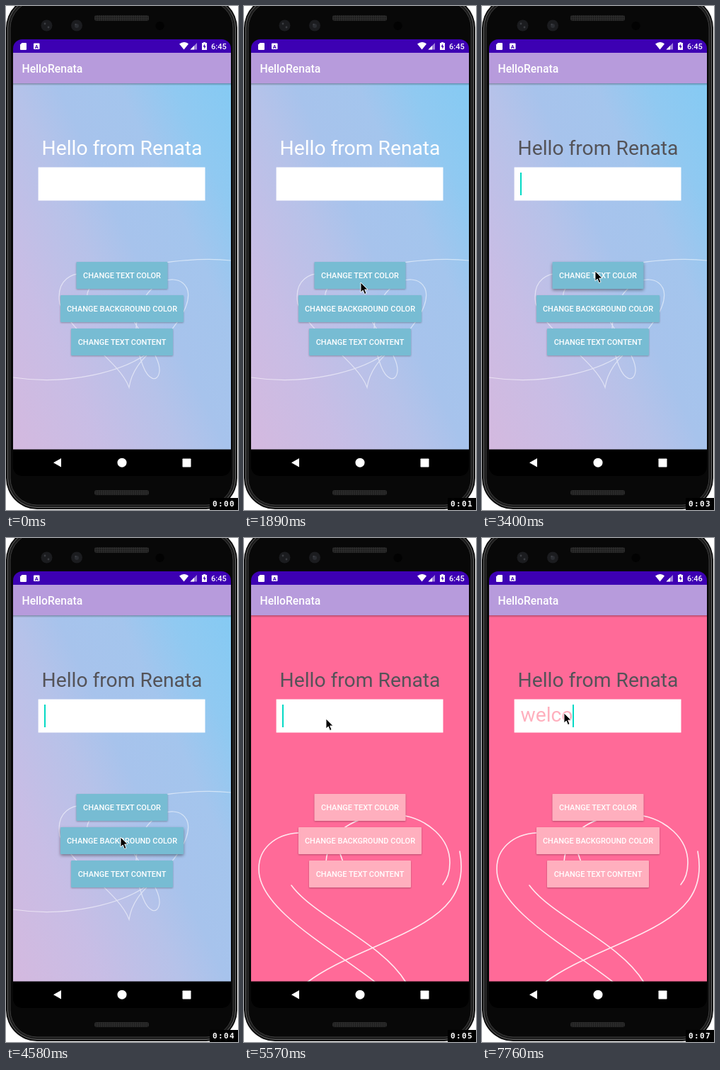
An HTML page that plays this animation: 328x711 px, repeating every 8000 ms.

```html
<!DOCTYPE html>
<html lang="en">
<head>
<meta charset="utf-8">
<title>HelloRenata</title>
<style>
html, body { margin: 0; width: 100%; height: 100%; overflow: hidden; background: #fff; }
svg { display: block; width: 328px; height: 711px; font-family: Roboto, sans-serif; }
.mid { text-anchor: middle; }
.medium { font-weight: 500; fill: #fff; }
.big { font-size: 28.25px; }
.lines { fill: none; stroke: #fff; stroke-linecap: round; }
.clock { font: bold 11px "DejaVu Sans Mono", monospace; letter-spacing: 1.38px; fill: #fff; }
</style>
</head>
<body>
<svg viewBox="0 0 328 711">
  <defs>
    <linearGradient id="sky" gradientUnits="userSpaceOnUse" x1="10" y1="626" x2="454" y2="419">
      <stop offset="0" stop-color="#d4b9df"/>
      <stop offset=".235" stop-color="#c8bde5"/>
      <stop offset=".44" stop-color="#b6c2e9"/>
      <stop offset=".56" stop-color="#a7c3ec"/>
      <stop offset=".72" stop-color="#a4c5ed"/>
      <stop offset=".86" stop-color="#90c9f1"/>
      <stop offset="1" stop-color="#86caf3"/>
    </linearGradient>
    <linearGradient id="barShade" x2="0" y2="1">
      <stop offset="0" stop-color="#000" stop-opacity=".28"/>
      <stop offset="1" stop-color="#000" stop-opacity="0"/>
    </linearGradient>
    <pattern id="mesh" width="3" height="3" patternUnits="userSpaceOnUse">
      <rect width="3" height="3" fill="#2c2c2c"/>
      <circle cx="1.5" cy="1.5" r=".9" fill="#151515"/>
    </pattern>
    <clipPath id="screen"><rect x="10" y="47" width="308" height="616" rx="13"/></clipPath>
  </defs>

  <!-- phone body -->
  <rect y="-13" width="327" height="723" rx="44" fill="#0c0c0c"/>
  <rect x="2.500" y="-10.500" width="322" height="718" rx="41.500" fill="#1c1c1c" stroke="#666"/>
  <rect x="6" y="-7" width="315" height="711" rx="38" fill="#080808" stroke="#3c3c3c"/>
  <rect x="125" y="13" width="77" height="8" rx="3" fill="url(#mesh)"/>
  <rect x="125" y="683" width="77" height="7" rx="3" fill="url(#mesh)"/>
  <g fill="#1b1c1f">
    <circle cx="57.500" cy="27.500" r="8"/><circle cx="100" cy="27.500" r="8"/>
    <circle cx="217.500" cy="28" r="6" fill="#020202"/>
  </g>
  <g fill="#3b3d42">
    <circle cx="55" cy="25" r="1.400"/><circle cx="60" cy="30" r="1.400"/>
    <circle cx="100" cy="28" r="3" fill="#2b2d32"/><circle cx="98.500" cy="26" r="1.200"/>
  </g>

  <g clip-path="url(#screen)">
    <g id="blueWall">
      <rect x="10" y="109" width="308" height="518" fill="url(#sky)"/>
      <g class="lines" stroke-width="1.200" opacity=".55">
        <path d="M10 524C90 536 165 515 200 490C235 462 262 425 257 402C252 382 225 380 205 400C180 425 180 470 191 500C200 530 215 532 217 515C218 495 195 470 178 440"/>
        <path d="M318 359C270 354 200 362 150 378C115 390 105 410 125 425"/>
        <path d="M115 378C95 375 70 385 76 420C90 460 160 500 174 538C178 512 195 495 215 478"/>
      </g>
    </g>
    <g id="pinkWall">
      <rect x="10" y="109" width="308" height="518" fill="#ff6a98"/>
      <g class="lines" stroke-width="1.600" opacity=".85">
        <path d="M77 416C42 418 20 440 21 468C21 525 130 582 186 627"/>
        <path d="M67 490C100 535 195 570 229 627"/>
        <path d="M305 442C316 500 285 530 226 558C165 587 125 600 89 627"/>
        <path d="M116 457C117 440 125 420 143 408C165 393 195 388 228 392C258 398 291 422 291 458C291 471 287 482 281 489"/>
        <path d="M134 440L140 457"/>
      </g>
    </g>

    <rect x="10" y="109" width="308" height="3.500" fill="url(#barShade)"/>
    <rect x="10" y="66" width="308" height="43" fill="#b79bdc"/>
    <rect x="10" y="47" width="308" height="19" fill="#3d00b3"/>
    <rect x="10" y="625.500" width="308" height="38"/>
    <text class="medium" x="22.500" y="94" font-size="15.700">HelloRenata</text>

    <!-- status icons -->
    <g fill="#fff">
      <path d="M22.500 52H28q1 0 1 1v8q0 1-1 1h-7q-1 0-1-1v-6.500z"/>
      <rect x="39" y="52.500" width="8.500" height="8.500" rx="1"/>
      <path d="M245 53.500Q251.500 48.500 258 53.500L251.500 61.500Z"/>
      <path d="M270 52V61.500H260.500Z" opacity=".5"/>
      <path d="M266 56V61.500H260.500Z"/>
      <path d="M279 51h3v1h2v10h-7v-10h2z"/>
      <path d="M281 53.500L278.500 57.500H280.300V60.500L282.700 56.500H281Z" fill="#3d00b3"/>
    </g>
    <text class="mid" x="43.200" y="59.500" font-size="7.500" font-weight="700" fill="#3d00b3">A</text>
    <text id="time" class="medium" x="290" y="60.700" font-size="11">6:45</text>

    <text id="title" class="mid big" x="164" y="210">Hello from Renata</text>
    <rect x="45.600" y="227.500" width="235.900" height="47" fill="#fff"/>
    <text id="entry" class="big" x="54.500" y="259" fill="#ffb0be"></text>
    <rect id="caret" y="235" width="2" height="32" fill="#03dac5"/>
    <g id="buttons"></g>

    <g fill="#fff">
      <path d="M67 644.200L78 638V650.400Z"/>
      <circle cx="164" cy="644.200" r="6.500"/>
      <rect x="249.500" y="638.500" width="12" height="12" rx=".7"/>
    </g>
  </g>

  <rect x="288" y="694" width="40" height="17"/>
  <text id="clock" class="clock" x="292" y="706"></text>
  <path id="pointer" d="M0 0V14L3.200 11L5.500 16.500L8 15.400L5.700 10H10Z" stroke="#fff" stroke-width=".9"/>
</svg>

<script>
const LOOP = 8000, STEP = 150;
const TEXT_AT = 3100, PINK_AT = 4880, MINUTE_AT = 7320;
const SECONDS = [1050, 2190, 3160, 4290, 5370, 6420, 7470];
const BLINKS = [150, 600, 1200, 1640, 2190, 2720, 3160, 3700, 4290, 4880, 5370, 5870, 6320];
const KEYS = [6320, 6720, 7170, 7470, 7760];
// time, x, y
const PATH = [
  [450, 226, 692], [600, 221, 680], [750, 221, 680], [900, 205, 560],
  [1350, 175, 430], [1800, 165, 390], [2100, 165, 390], [2700, 160, 374],
  [3600, 160, 374], [4200, 162, 422], [5100, 162, 422], [5550, 116, 255], [5850, 116, 247]
];
// label, x, y, width, press start, press end
const BUTTONS = [
  ["CHANGE TEXT COLOR", 99.5, 361, 129, 3010, 3850],
  ["CHANGE BACKGROUND COLOR", 77, 408, 174, 4580, 4880],
  ["CHANGE TEXT CONTENT", 92, 455, 144, -1, -1]
];

const $ = id => document.getElementById(id);
const passed = (times, t) => times.filter(at => at <= t).length;
const show = (el, on) => el.setAttribute("visibility", on ? "visible" : "hidden");

function add(parent, tag, attrs) {
  const el = document.createElementNS("http://www.w3.org/2000/svg", tag);
  for (const k in attrs) el.setAttribute(k, attrs[k]);
  return parent.appendChild(el);
}

const buttons = BUTTONS.map(([label, x, y, width, from, to]) => {
  const g = add($("buttons"), "g", {});
  const face = add(g, "rect", { x, y, width, height: 38, rx: 1 });
  add(g, "text", { class: "mid medium", x: 164, y: y + 23, "font-size": 10.98 }).textContent = label;
  return { face, from, to };
});

function pointerAt(t) {
  const now = Math.floor(t / STEP) * STEP;
  const i = PATH.findIndex(p => p[0] > now);
  if (i < 0) return PATH[PATH.length - 1].slice(1);
  if (i === 0) return null;
  const [t0, x0, y0] = PATH[i - 1], [t1, x1, y1] = PATH[i];
  const k = (now - t0) / (t1 - t0);
  return [x0 + (x1 - x0) * k, y0 + (y1 - y0) * k];
}

function draw(t) {
  const pink = t >= PINK_AT;
  show($("blueWall"), !pink);
  show($("pinkWall"), pink);
  $("title").setAttribute("fill", t < TEXT_AT ? "#fff" : "#545358");
  $("time").textContent = t < MINUTE_AT ? "6:45" : "6:46";
  $("clock").textContent = "0:0" + passed(SECONDS, t);

  for (const { face, from, to } of buttons) {
    const down = t >= from && t < to;
    face.setAttribute("fill", pink ? "#ffafbe" : "#77bcd3");
    face.style.filter = down
      ? "drop-shadow(0 2px 2px rgba(0,0,0,.4))"
      : "drop-shadow(0 1px 1px rgba(0,0,0,.28))";
  }

  const entry = $("entry");
  entry.textContent = "welco".slice(0, passed(KEYS, t));
  const length = entry.textContent ? entry.getComputedTextLength() : 0;
  $("caret").setAttribute("x", Math.round(54.2 + length));
  show($("caret"), passed(BLINKS, t) % 2);

  const spot = pointerAt(t);
  show($("pointer"), spot);
  if (spot) $("pointer").setAttribute("transform", `translate(${spot.map(Math.round)})`);
}

const start = performance.now();
function tick() {
  draw((performance.now() - start) % LOOP);
  requestAnimationFrame(tick);
}
tick();
</script>
</body>
</html>
```
